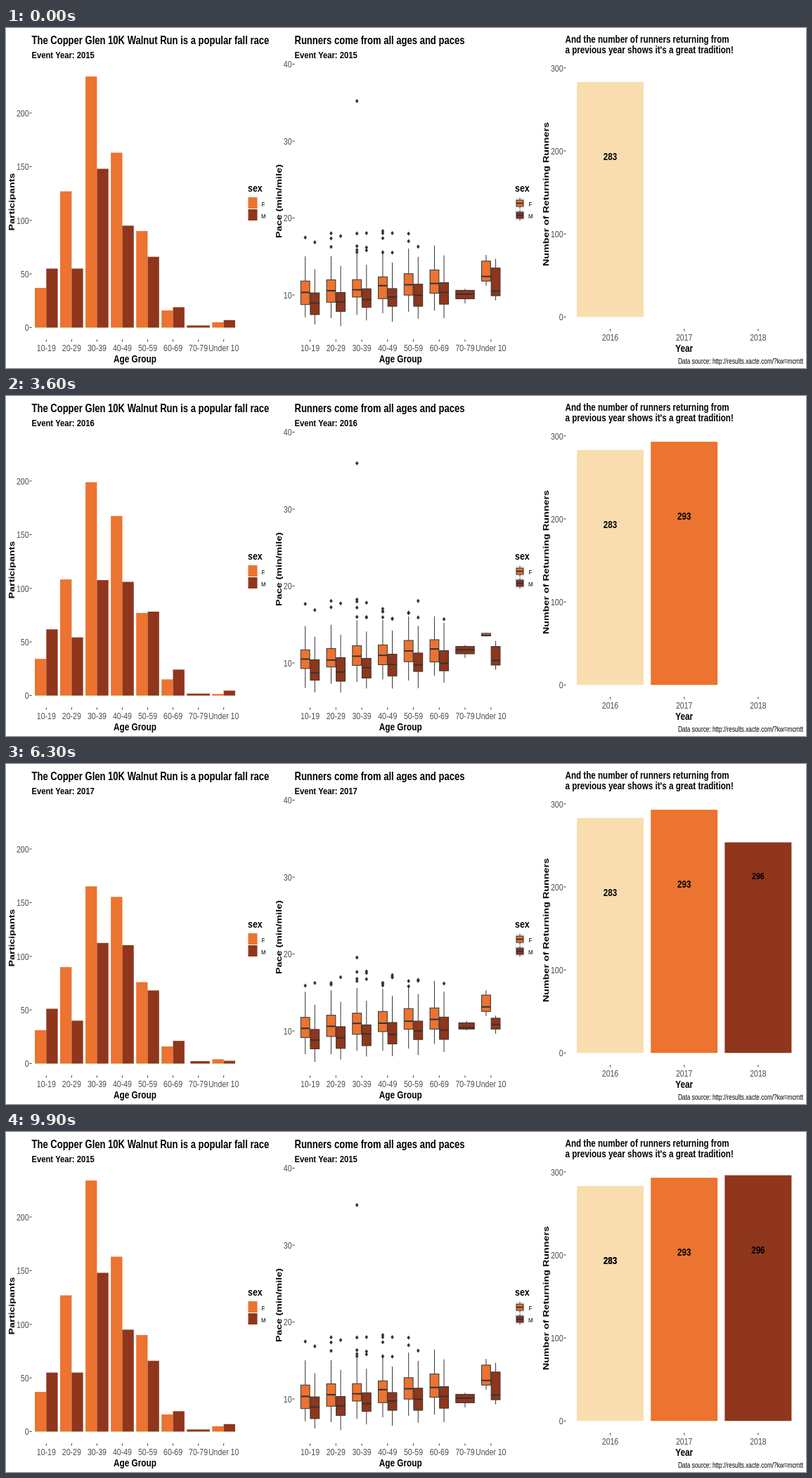
Write an HTML page with a canvas that moves like this. It is 1138 by 484 pixels and loops after 10 s.

```html
<!DOCTYPE html>
<html lang="en">
<head>
<meta charset="utf-8">
<title>Race participation</title>
<style>
html, body { margin: 0; width: 100%; height: 100%; overflow: hidden; background: #fff; }
canvas { display: block; }
</style>
</head>
<body>
<canvas id="stage" width="1138" height="484"></canvas>
<script>
const ctx = document.getElementById('stage').getContext('2d');
const LOOP = 10000, STEP = 100, SQUEEZE = 0.825;
const ORANGE = '#ec7330', BROWN = '#8f361c', TAN = '#f9ddaf', INK = '#333';
const SEX_COLORS = [ORANGE, BROWN];
const AGES = ['10-19', '20-29', '30-39', '40-49', '50-59', '60-69', '70-79', 'Under 10'];
const YEARS = [2015, 2016, 2017, 2018];
const YEAR_MOVES = [[800, 2500], [3400, 5000], [5800, 7400], [8300, 9900]];

// Participants per year, one line per age group: women, men.
const COUNTS = [
  [37, 35, 29, 36], [55, 63, 53, 47],
  [127, 111, 89, 92], [55, 57, 35, 51],
  [234, 204, 163, 170], [148, 106, 119, 98],
  [163, 169, 156, 154], [95, 106, 106, 120],
  [90, 78, 70, 89], [66, 80, 66, 73],
  [16, 15, 16, 16], [19, 25, 19, 26],
  [0, 0, 0, 2], [2, 2, 1, 5],
  [5, 1, 5, 2], [7, 5, 2, 4],
];
// Top whisker, quartiles and bottom whisker of the youngest runners, by sex.
const PACE_LEVELS = [[14.9, 11.7, 10.3, 9, 6.8], [13.6, 10.3, 8.8, 7.6, 5.9]];
const PACE_PER_AGE = 0.27;
// Yearly medians of the last two, very small age groups.
const SMALL_MEDIANS = [Array(4).fill(14.4), [10.1, 11.9, 10.4, 10.5],
  [12.4, 13.6, 13.6, 12.1], [10.5, 10.3, 10.5, 11.6]];
const SLOWEST = [35.2, 38.5, 20.5, 16.4], SLOWEST_SERIES = 4, FIRST_SMALL = 12;

const mix = (a, b, p) => a + (b - a) * p;
const clamp = v => Math.max(0, Math.min(1, v));
const progress = (t, [start, end]) => clamp((t - start) / (end - start));
const random = seed => {
  const v = Math.sin(seed * 127.1 + 11.7) * 43758.5453;
  return v - Math.floor(v);
};

function paceLevels(k, year) {
  const n = COUNTS[k][year];
  if (k >= FIRST_SMALL) {
    const mid = SMALL_MEDIANS[k - FIRST_SMALL][year], above = n - 1, below = Math.min(1, n - 1);
    return [mid + 0.7 * above, mid + 0.5 * above, mid, mid - 0.6 * below, mid - 1.2 * below];
  }
  return PACE_LEVELS[k % 2].map((v, i) =>
    v + PACE_PER_AGE * (k >> 1) + 0.6 * (random(k * 20 + year * 5 + i) - 0.5));
}

function paceOutliers(k, year) {
  const list = Array.from({ length: Math.round(COUNTS[k][year] / 45) },
    (_, i) => 15.5 + 3 * random(500 + k * 24 + year * 6 + i) ** 1.3);
  if (k === SLOWEST_SERIES) list[year % 2] = SLOWEST[year];
  return list;
}

// Left and right edge of a series within its group; a lone series takes the full width.
function slot(k, year, half) {
  if (k % 2 === 0) return [-half, 0];
  return [COUNTS[k - 1][year] ? 0 : -half, half];
}

const barShape = (k, year) => COUNTS[k][year] && [...slot(k, year, 16.3), COUNTS[k][year]];
const boxShape = (k, year) => COUNTS[k][year] && [...slot(k, year, 13.6), ...paceLevels(k, year)];

// A shape missing on one side appears or vanishes halfway.
const blend = (a, b, p) => a && b ? a.map((v, i) => mix(v, b[i], p)) : p < 0.5 ? a : b;

function blendOutliers(a, b, p) {
  if (p === 0) return a;
  if (p === 1) return b;
  if (!a.length || !b.length) return a.length ? a : b;
  return Array.from({ length: Math.max(a.length, b.length) },
    (_, i) => mix(a[i % a.length], b[i % b.length], p));
}

function rect(x, y, w, h, color) {
  ctx.fillStyle = color;
  ctx.fillRect(x, y, w, h);
}

function line(x1, y1, x2, y2, width = 1) {
  ctx.strokeStyle = INK;
  ctx.lineWidth = width;
  ctx.beginPath();
  ctx.moveTo(x1, y1);
  ctx.lineTo(x2, y2);
  ctx.stroke();
}

function text(str, x, y, size, { align = 'left', bold = true, color = '#000', turn = 0 } = {}) {
  ctx.save();
  ctx.translate(x, y);
  ctx.scale(SQUEEZE, 1);
  ctx.rotate(turn);
  ctx.font = `${bold ? 'bold ' : ''}${size}px "Liberation Sans", Arial, sans-serif`;
  ctx.textAlign = align;
  ctx.fillStyle = color;
  ctx.fillText(str, 0, 0);
  ctx.restore();
}

const tickText = (str, x, y, align) => text(str, x, y, 12.8, { align, bold: false, color: '#4d4d4d' });
const sideTitle = (str, x, y) => text(str, x, y, 14.3, { align: 'center', turn: -Math.PI / 2 });

function yAxis(x, values, toY) {
  for (const v of values) {
    tickText(v, x - 3, toY(v) + 4.8, 'right');
    line(x - 2, toY(v), x + 1, toY(v));
  }
}

function xAxis(labels, x0, step, y, title) {
  labels.forEach((label, i) => {
    const x = x0 + i * step;
    line(x, y - 1.5, x, y + 1.5);
    tickText(label, x, y + 15, 'center');
  });
  text(title, x0 + step * (labels.length - 1) / 2, y + 31, 14.3, { align: 'center' });
}

function drawBox(left, right, [hi, q3, mid, q1, lo], color) {
  const x = (left + right) / 2;
  line(x, hi, x, q3);
  line(x, q1, x, lo);
  rect(left, q3, right - left, q1 - q3, color);
  ctx.strokeRect(left, q3, right - left, q1 - q3);
  line(left, mid, right, mid, 2);
}

function drawDot(x, y) {
  ctx.fillStyle = INK;
  ctx.beginPath();
  ctx.moveTo(x, y - 3);
  ctx.lineTo(x + 2.3, y);
  ctx.lineTo(x, y + 3);
  ctx.lineTo(x - 2.3, y);
  ctx.fill();
}

function legendText(x) {
  text('sex', x, 233, 15);
  text('F', x + 19.5, 254, 9.6, { bold: false });
  text('M', x + 19, 271, 9.6, { bold: false });
}

function drawCounts(from, to, p, subtitle) {
  const toY = v => 426.5 - v * 1.5275;
  const x0 = 57.3, step = 36.05;
  text('The Copper Glen 10K Walnut Run is a popular fall race', 36.5, 23, 15.8);
  text(subtitle, 36.5, 42.5, 13.6);
  sideTitle('Participants', 11.5, 247.5);
  yAxis(35.5, [0, 50, 100, 150, 200], toY);
  xAxis(AGES, x0, step, 445, 'Age Group');
  COUNTS.forEach((_, k) => {
    const bar = blend(barShape(k, from), barShape(k, to), p);
    if (!bar) return;
    const [l, r, count] = bar;
    rect(x0 + (k >> 1) * step + l, toY(count), r - l, toY(0) - toY(count), SEX_COLORS[k % 2]);
  });
  legendText(344);
  SEX_COLORS.forEach((color, i) => rect(344.5, 241 + i * 17, 13, 16, color));
}

function drawPaces(from, to, p, subtitle) {
  const toY = v => 489.5 - v * 10.95;
  const x0 = 432.5, step = 36.75;
  text('Runners come from all ages and paces', 410.5, 23, 15.8);
  text(subtitle, 410.5, 42.5, 13.6);
  sideTitle('Pace (min/mile)', 391.5, 246.5);
  yAxis(409.5, [10, 20, 30, 40], toY);
  xAxis(AGES, x0, step, 445, 'Age Group');
  COUNTS.forEach((_, k) => {
    const box = blend(boxShape(k, from), boxShape(k, to), p);
    if (!box) return;
    const [l, r, ...levels] = box;
    const x = x0 + (k >> 1) * step;
    drawBox(x + l + 0.4, x + r - 0.4, levels.map(toY), SEX_COLORS[k % 2]);
    for (const pace of blendOutliers(paceOutliers(k, from), paceOutliers(k, to), p)) {
      drawDot(x + (l + r) / 2, toY(pace));
    }
  });
  legendText(724);
  SEX_COLORS.forEach((color, i) => {
    const y = 241 + i * 17;
    rect(724.5, y, 13, 16.5, '#f2f2f2');
    drawBox(726, 736, [y + 1, y + 4, y + 8.5, y + 13, y + 16], color);
  });
}

function drawReturning(t) {
  const toY = v => 411.3 - v * 1.1815;
  const x0 = 859.5, step = 105.2;
  text('And the number of runners returning from', 795.5, 21, 14.1);
  text("a previous year shows it's a great tradition!", 795.5, 36, 14.1);
  sideTitle('Number of Returning Runners', 771.5, 236.5);
  yAxis(795.5, [0, 100, 200, 300], toY);
  xAxis(['2016', '2017', '2018'], x0, step, 430, 'Year');
  text('Data source: http://results.xacte.com/?kw=mcmtt', 1134, 477.5, 10, { align: 'right', bold: false });

  // Labels grow in whole font sizes and hang below the final bar top.
  const label = (i, count, p) => {
    if (p <= 0) return;
    const grown = Math.max(3, Math.ceil(13 * p)) / 13, size = 14 * grown;
    text(count, x0 + i * step, toY(count) + 106 * grown + size * 0.36, size, { align: 'center' });
  };
  const column = (i, count, color, p) => {
    const top = toY(count * p);
    rect(x0 + i * step - 47.5, top, 95, toY(0) - top, color);
    label(i, count, p);
  };
  column(0, 283, TAN, 1);
  column(1, 293, ORANGE, progress(t, [1100, 3300]));
  column(2, 296, BROWN, progress(t, [4500, 6600]));
  label(0, 283, progress(t, [7700, 9900]));
}

function draw(now) {
  const t = Math.floor(now % LOOP / STEP) * STEP;
  const from = Math.max(0, YEAR_MOVES.filter(([start]) => start <= t).length - 1);
  const to = (from + 1) % YEARS.length;
  const p = progress(t, YEAR_MOVES[from]);
  const subtitle = `Event Year: ${YEARS[p < 0.5 ? from : to]}`;
  rect(0, 0, 1138, 484, '#fff');
  drawCounts(from, to, p, subtitle);
  drawPaces(from, to, p, subtitle);
  drawReturning(t);
}

const began = performance.now();
function tick() {
  draw(performance.now() - began);
  requestAnimationFrame(tick);
}
tick();
</script>
</body>
</html>
```
